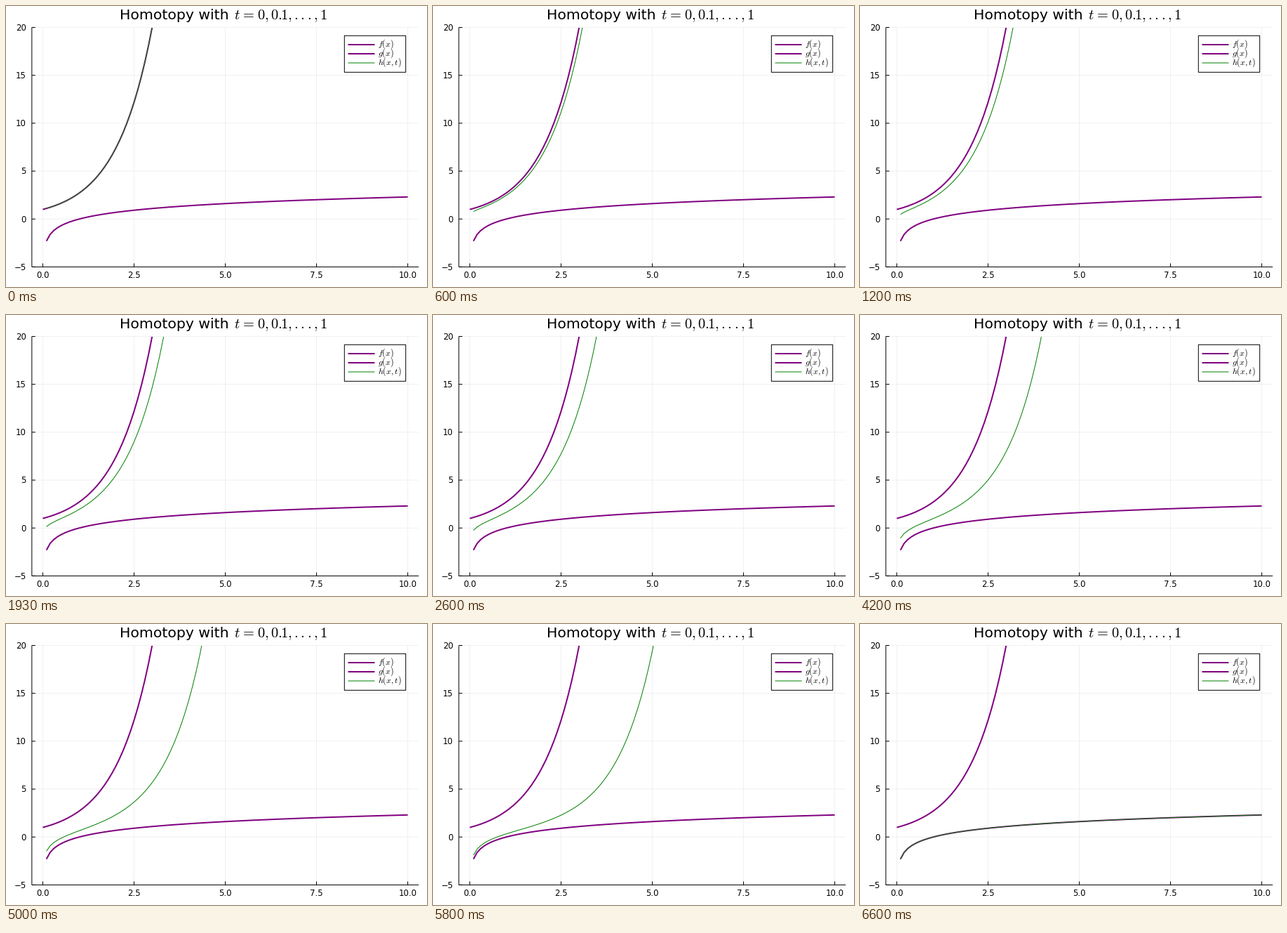
These frames come from a looping animation (600 px wide and 400 px high, 6.67 s). A matplotlib script:

```python
import numpy as np
import matplotlib.pyplot as plt
from matplotlib.animation import FuncAnimation
from matplotlib.lines import Line2D
from matplotlib.patches import Rectangle

W, H, DPI = 600, 400, 100
FRAMES, TICK_MS = 290, 23
FPS, STEPS = 15, 99  # the morph advances 15 times a second
LEFT, RIGHT, TOP, BOTTOM = 36.85, 588.2, 30.5, 371.4
PT = 72 / DPI  # points per pixel

plt.rcParams["font.family"] = "DejaVu Sans"
plt.rcParams["mathtext.fontset"] = "cm"

fig = plt.figure(figsize=(W / DPI, H / DPI), dpi=DPI, facecolor="white")
ax = fig.add_axes([LEFT / W, 1 - BOTTOM / H, (RIGHT - LEFT) / W, (BOTTOM - TOP) / H])
ax.set(xlim=(-0.3, 10.3), ylim=(-5, 20))
ax.axis("off")


def px(v):
    return LEFT + (v + 0.3) / 10.6 * (RIGHT - LEFT)


def py(v):
    return BOTTOM - (v + 5) / 25 * (BOTTOM - TOP)


def label(x, y, text, size, ha="left"):
    """Place text by its baseline, in pixels from the top left."""
    fig.text(x / W, 1 - y / H, text, fontsize=size * PT, ha=ha,
             va="baseline", zorder=6)


def line(x0, y0, x1, y1, color="black", width=1, **style):
    fig.add_artist(Line2D([x0 / W, x1 / W], [1 - y0 / H, 1 - y1 / H],
                          color=color, lw=width * PT, snap=False,
                          solid_capstyle="butt", **style))


# Grid, ticks and axes
grid = dict(alpha=0.06, zorder=-1)
for v in np.arange(0, 10.1, 2.5):
    x = px(v)
    line(x, TOP, x, BOTTOM, **grid)
    line(x, BOTTOM, x, BOTTOM - 5)
    label(x, 387, f"{v:.1f}", 11.8, ha="center")
for v in range(-5, 21, 5):
    y = py(v)
    line(LEFT, y, RIGHT, y, **grid)
    line(LEFT, y, LEFT + 5, y)
    label(28.7, y + 4.4, str(v).replace("-", "\u2212"), 11.8, ha="right")
line(LEFT, TOP, LEFT, BOTTOM)
line(LEFT, BOTTOM, RIGHT, BOTTOM)

# Title
label(162, 19, "Homotopy with", 20.4)
label(324.5, 19, r"$t\hspace{0.08}=\hspace{0.08}0, 0.\!\!1, . . . , 1$", 20.4)

# Curves
x = np.arange(101) / 10
f = np.exp(x)
g = np.full_like(x, np.nan)
g[1:] = np.log(x[1:])
for curve in (f, g):
    ax.plot(x, curve, color="purple", lw=2 * PT, solid_capstyle="butt")
morph, = ax.plot([], [], color="green", lw=PT, solid_capstyle="butt")

# Legend
fig.add_artist(Rectangle((482.3 / W, 1 - 94.3 / H), 87.4 / W, 52 / H, fc="white",
                         ec="black", lw=PT, snap=False, zorder=4))
entries = (("$f(x)$", "purple", 2), ("$g(x)$", "purple", 2), ("$h(x,t)$", "green", 1))
for i, (name, color, width) in enumerate(entries):
    y = 55 + 13 * i
    line(487.5, y, 525.5, y, color, width, zorder=6)
    label(530.5, y + 3, name, 12)


def update(n):
    step = min((n + 1) * TICK_MS * FPS // 1000, STEPS)
    t = step / STEPS
    morph.set_data(x, (1 - t) * f + t * g)
    return morph,


anim = FuncAnimation(fig, update, frames=FRAMES, init_func=lambda: update(0),
                     interval=TICK_MS, repeat=True, repeat_delay=0)
plt.show()
```
